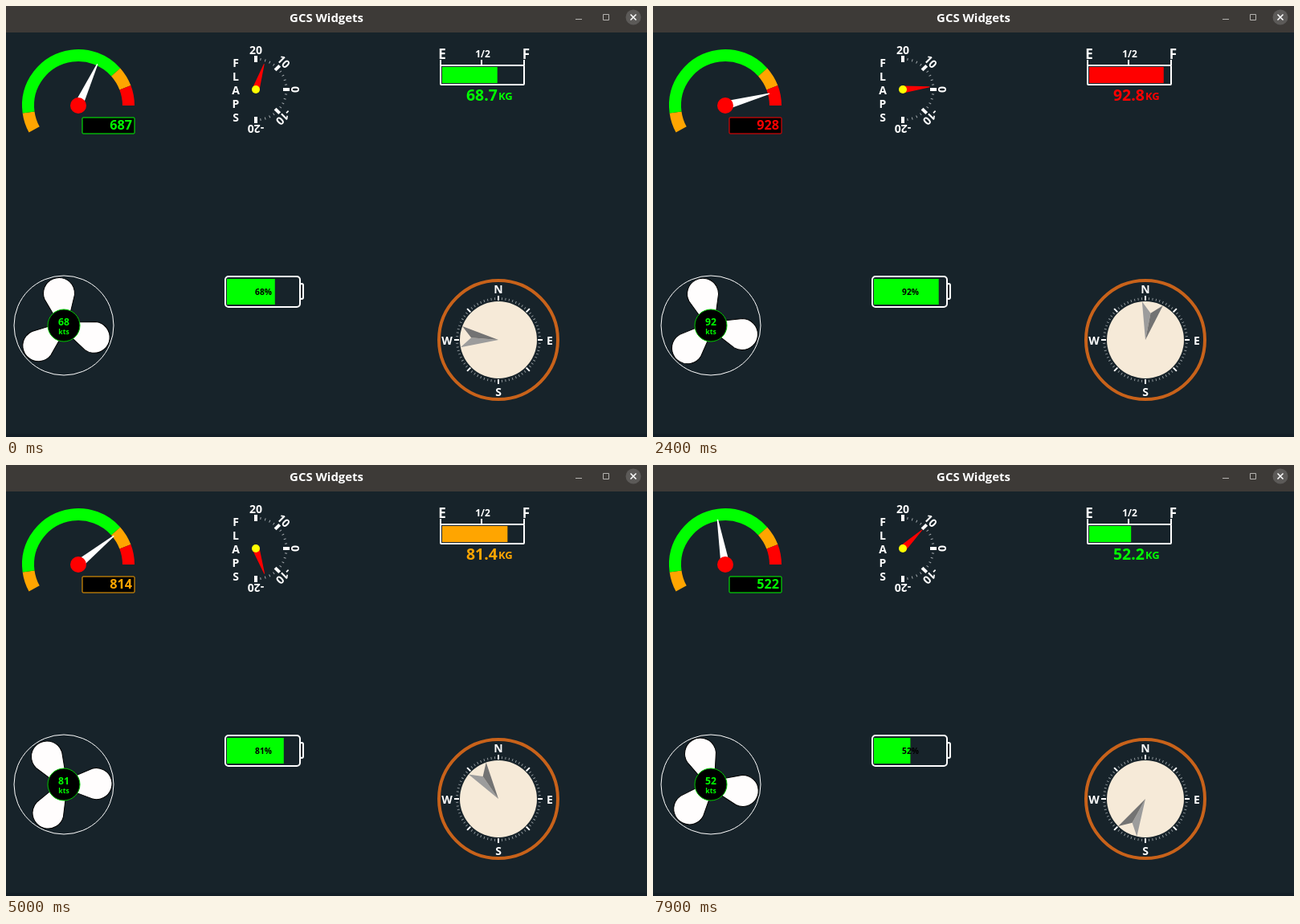
An HTML page with a canvas for the animation above (8000 ms loop, 798 by 537 pixels).

```html
<!DOCTYPE html>
<html lang="en">
<head>
<meta charset="utf-8">
<title>GCS Widgets</title>
<style>
  html, body { margin: 0; width: 798px; height: 537px; overflow: hidden; background: #17232a; }
  canvas { display: block; }
</style>
</head>
<body>
<canvas id="stage" width="798" height="537"></canvas>
<script>
const ctx = document.getElementById('stage').getContext('2d');
const TAU = Math.PI * 2;
const RAD = Math.PI / 180;
const LOOP = 8000, TICK = 100;
const GREEN = '#00ff00', ORANGE = '#ffa500', RED = '#ff0000', WHITE = '#ffffff', DARK = '#17232a';

// Tracks of [seconds, value], linear between the points.
const LEVEL = [[-0.1, 67.7], [0, 68.7], [1.7, 85.3], [3.08, 100], [3.2, 98.8], [4.3, 88],
  [5.7, 74.7], [7, 61.3], [7.9, 52.2], [8, 51.2]];
const FLAP = [[0, 18], [0.43, 0], [1.7, 56.3], [3.2, 116.6], [4.3, 171], [4.5, 180],
  [5.7, 135], [7, 83], [7.9, 46], [8, 42]];
const SPIN = [[0, 111.5], [1.7, 5325], [3.2, 10341], [4.3, 13722], [5.7, 17895.5],
  [7, 22100.5], [7.9, 24941.3], [8, 25255]];

function track(keys, t) {
  let i = 1;
  while (i < keys.length - 1 && keys[i][0] < t) i++;
  const [t0, a] = keys[i - 1], [t1, b] = keys[i];
  return a + (b - a) * (t - t0) / (t1 - t0);
}

function text(str, x, y, size, color = WHITE, align = 'center') {
  ctx.font = `bold ${size}px "Open Sans", "Noto Sans", sans-serif`;
  ctx.fillStyle = color;
  ctx.textAlign = align;
  ctx.fillText(str, x, y);
}

function rect(x, y, w, h, color) {
  ctx.fillStyle = color;
  ctx.fillRect(x, y, w, h);
}

function frame(x, y, w, h, r, color, width) {
  ctx.beginPath();
  ctx.roundRect(x, y, w, h, r);
  ctx.strokeStyle = color;
  ctx.lineWidth = width;
  ctx.stroke();
}

function disc(x, y, r, color) {
  ctx.beginPath();
  ctx.arc(x, y, r, 0, TAU);
  ctx.fillStyle = color;
  ctx.fill();
}

function ring(x, y, r, color, width, from = 0, to = TAU) {
  ctx.beginPath();
  ctx.arc(x, y, r, from, to);
  ctx.strokeStyle = color;
  ctx.lineWidth = width;
  ctx.stroke();
}

function poly(points, color) {
  ctx.beginPath();
  points.forEach(([x, y]) => ctx.lineTo(x, y));
  ctx.closePath();
  ctx.fillStyle = color;
  ctx.fill();
}

// Draws in a frame centred on x, y whose up direction is turned clockwise.
function turned(x, y, deg, draw) {
  ctx.save();
  ctx.translate(x, y);
  ctx.rotate(deg * RAD);
  draw();
  ctx.restore();
}

const levelColor = (v, warn) => v >= 90 ? RED : v >= warn ? ORANGE : GREEN;

function titleBar() {
  rect(0, 0, 798, 33, '#3d3a37');
  text('GCS Widgets', 399, 20, 14.9);
  rect(709, 16, 8, 1, '#b5b3b0');
  frame(743.5, 10.5, 7, 7, 0, '#b5b3b0', 1);
  disc(781, 14, 9.5, '#5c5a58');
  ctx.beginPath();
  ctx.moveTo(777.5, 10.5);
  ctx.lineTo(784.5, 17.5);
  ctx.moveTo(784.5, 10.5);
  ctx.lineTo(777.5, 17.5);
  ctx.strokeStyle = WHITE;
  ctx.lineWidth = 1.5;
  ctx.stroke();
}

function dialGauge(v) {
  const x = 90, y = 124, sweep = Math.PI + 0.5;
  const arc = (from, to, color) =>
    ring(x, y, 62.5, color, 15, (from - 1) * sweep, (to - 1) * sweep);
  arc(0, 0.1, ORANGE);
  arc(0.1, 0.8, GREEN);
  arc(0.8, 0.9, ORANGE);
  arc(0.9, 1, RED);
  turned(x, y, 90 + (v / 100 - 1) * sweep / RAD, () =>
    poly([[-5.5, 0], [-0.7, -57], [0.7, -57], [5.5, 0]], WHITE));
  disc(x, y, 10, RED);

  const color = levelColor(v, 80);
  rect(95, 139, 65, 20, '#000');
  frame(95, 139, 65, 20, 1, color, 1);
  text(Math.round(v * 10), 157, 154, 16.2, color, 'right');
}

function flaps(angle) {
  const x = 311, y = 104;
  [...'FLAPS'].forEach((c, i) => text(c, 286, 76 + i * 17, 14));
  for (let i = 0; i <= 20; i++) {
    turned(x, y, i * 9, () => {
      if (i % 5) rect(-0.5, -39.5, 1, 3, '#a4aaae');
      else {
        rect(-2, -42, 4, 8, WHITE);
        text(20 - i * 2, 0, -44, 14);
      }
    });
  }
  turned(x, y, angle, () => poly([[-4.5, 0], [-0.4, -33.5], [0.4, -33.5], [4.5, 0]], RED));
  disc(x, y, 5, '#ffff00');
}

function fuel(v) {
  const color = levelColor(v, 70);
  text('E', 543, 66, 17);
  text('F', 647.5, 66, 17);
  text('1/2', 593.5, 64, 12);
  for (const x of [540, 591, 644]) rect(x, 67, 2, 7, WHITE);
  frame(541, 74, 104, 24, 1, WHITE, 2);
  rect(543, 76, v, 20, color);
  text(v.toFixed(1), 573, 118, 19.4, color, 'left');
  text('KG', 613, 117, 13, color, 'left');
}

function propeller(angle, knots) {
  const x = 72, y = 398;
  ring(x, y, 62, WHITE, 1);
  for (let i = 0; i < 3; i++) {
    turned(x, y, angle + i * 120, () => {
      ctx.beginPath();
      ctx.moveTo(-11, -16);
      ctx.arc(0, -40.5, 19.5, Math.PI - 0.25, 0.25);
      ctx.lineTo(11, -16);
      ctx.closePath();
      ctx.fillStyle = '#fffdfd';
      ctx.fill();
      ctx.strokeStyle = '#000';
      ctx.lineWidth = 1;
      ctx.stroke();
    });
  }
  disc(x, y, 20, '#000');
  ring(x, y, 20, '#00c800', 1);
  text(knots, x, 398, 12.2, GREEN);
  text('kts', x, 409, 8.6, GREEN);
}

function battery(v) {
  frame(366, 346, 4, 19, 2, WHITE, 2);
  ctx.beginPath();
  ctx.roundRect(273, 337, 93, 38, 4);
  ctx.fillStyle = DARK;
  ctx.fill();
  frame(273, 337, 93, 38, 4, WHITE, 2);
  rect(275, 340, v * 0.87, 32, GREEN);
  text(Math.floor(v) + '%', 320.5, 360, 10.2, '#000');
}

function compass(heading) {
  const x = 613, y = 416;
  ring(x, y, 74, '#c8621a', 4);
  for (let a = 0; a < 360; a += 5) {
    turned(x, y, a, () => {
      if (a % 45) rect(-0.5, -53, 1, 3, '#8f979b');
      else rect(-1, -55, 2, 6, WHITE);
    });
  }
  disc(x, y, 48, '#f6ead8');
  text('N', x, 358, 14);
  text('E', 677, 422, 14);
  text('S', x, 486, 14);
  text('W', 549, 422, 14);
  const wx = 48 * Math.sin(16 * RAD), wy = -48 * Math.cos(16 * RAD);
  turned(x, y, heading, () => {
    poly([[0, 0], [-wx, wy], [0, -34]], '#9c9c9c');
    poly([[0, 0], [wx, wy], [0, -34]], '#737373');
  });
}

function draw(ms) {
  const t = Math.floor(ms % LOOP / TICK) * TICK / 1000;
  const v = track(LEVEL, t) + 1e-6;
  rect(0, 0, 798, 537, DARK);
  rect(0, 533, 798, 4, '#131e26');
  titleBar();
  dialGauge(v);
  flaps(track(FLAP, t));
  fuel(v);
  propeller(track(SPIN, t) % 360, Math.floor(track(LEVEL, t - 0.05)));
  battery(v);
  compass(v * 4);
}

const start = performance.now();
function loop(now) {
  draw(Math.max(0, now - start));
  requestAnimationFrame(loop);
}
draw(0);
requestAnimationFrame(loop);
</script>
</body>
</html>
```
